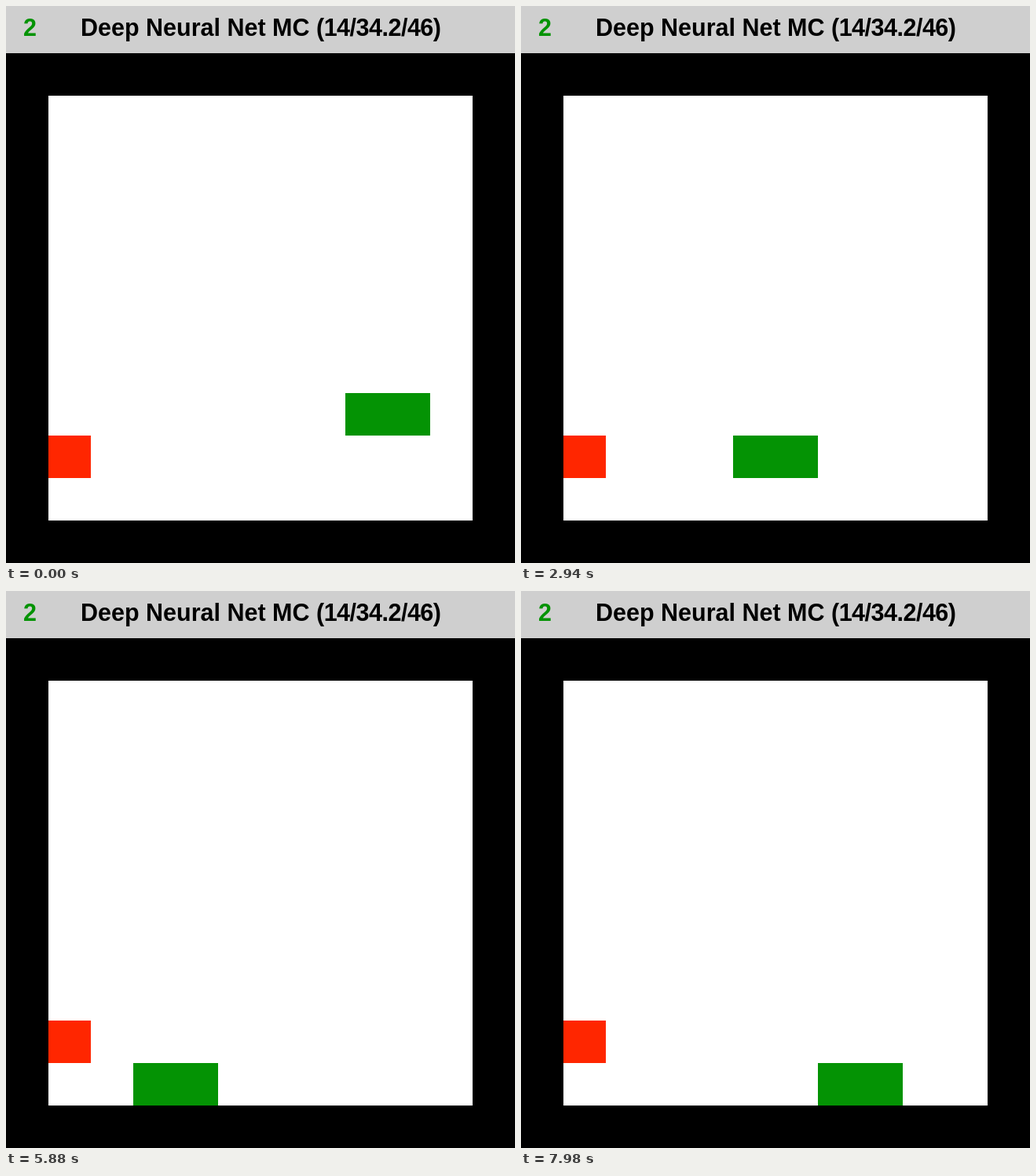
An HTML page that plays this animation: 648x708 px, repeating every 8000 ms.

```html
<!DOCTYPE html>
<html lang="en">
<head>
<meta charset="utf-8">
<title>Snake</title>
<style>
  html, body { margin: 0; width: 100%; height: 100%; overflow: hidden; background: #000; }
  svg { display: block; }
  text { font: bold 30.5px "Liberation Sans", Arial, sans-serif; font-kerning: none; }
  .score { letter-spacing: -.5px; }
  .green { fill: #049304; }
</style>
</head>
<body>
<svg width="648" height="708" viewBox="0 0 648 708">
  <rect width="648" height="708"/>
  <rect width="648" height="60" fill="#cfcfcf"/>
  <text class="green" x="22" y="37.5">2</text>
  <text x="95" y="37.5">Deep Neural Net MC <tspan class="score">(14/34.2/46)</tspan></text>
  <rect x="54" y="114" width="540" height="540" fill="#fff"/>
  <rect x="54" y="546" width="54" height="54" fill="#ff2600"/>
  <rect id="snake" class="green"/>
</svg>
<script>
const CELL = 54, LEFT = 54, TOP = 114, LOOP = 8000;
const dirs = { U: [0, -1], D: [0, 1], L: [-1, 0], R: [1, 0] };
const moves = 'DDLLLULULDLDRRRURDR';
const times = [120, 840, 1320, 1620, 1980, 2280, 2940, 3420, 3960, 4260,
  4800, 5220, 5820, 6120, 6420, 6960, 7320, 7620, 7980];

// Head positions in grid cells; the snake covers two neighbours of this path.
const path = [[7, 7], [8, 7]];
for (const m of moves) {
  const [x, y] = path[path.length - 1], [dx, dy] = dirs[m];
  path.push([x + dx, y + dy]);
}

const snake = document.getElementById('snake');

function draw(now) {
  const step = times.filter(t => t <= now % LOOP).length;
  const [ax, ay] = path[step], [bx, by] = path[step + 1];
  const box = {
    x: LEFT + CELL * Math.min(ax, bx),
    y: TOP + CELL * Math.min(ay, by),
    width: CELL * (1 + Math.abs(ax - bx)),
    height: CELL * (1 + Math.abs(ay - by))
  };
  for (const key in box) snake.setAttribute(key, box[key]);
}

function tick() {
  draw(performance.now() - start);
  requestAnimationFrame(tick);
}

const start = performance.now();
tick();
</script>
</body>
</html>
```
